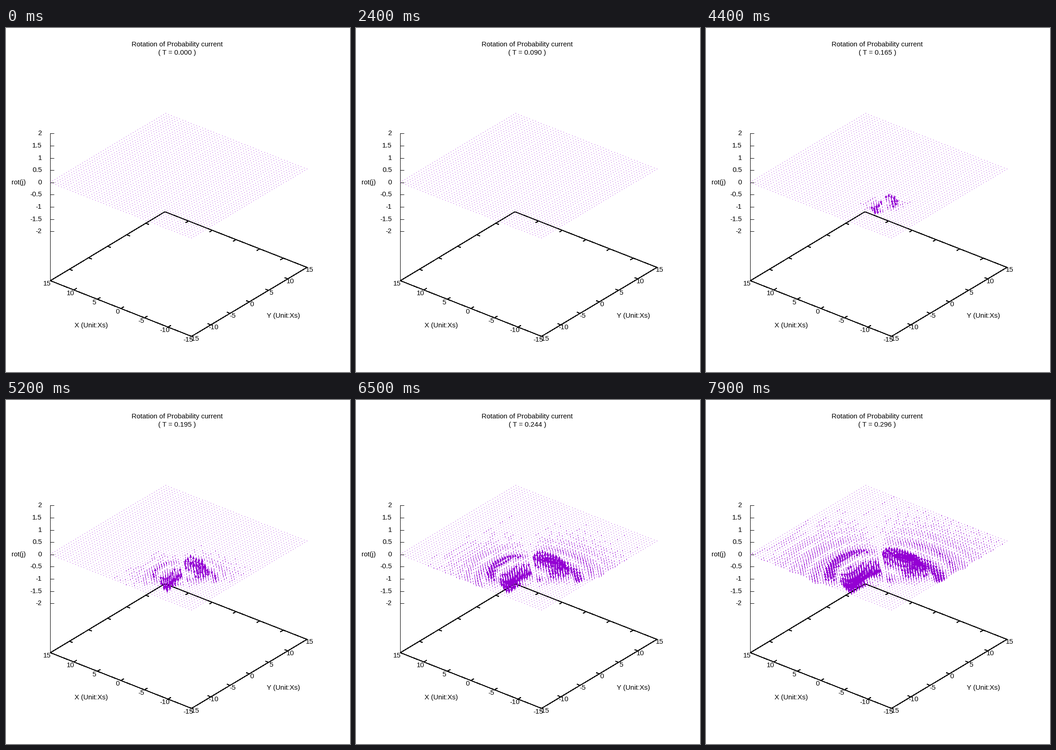
These frames come from a looping animation (748 px wide and 748 px high, 8 s). A matplotlib script:

```python
import numpy as np
import matplotlib.pyplot as plt
from matplotlib.animation import FuncAnimation
from matplotlib.collections import LineCollection, PolyCollection

SIZE, DPI = 748, 100
FRAMES, INTERVAL = 80, 100
DT = 0.00375
PX = 72 / DPI              # one pixel in points
Z_UNIT = 53.25             # pixels per unit of rot(j)
VIOLET = "#9400d3"

plt.rcParams["font.family"] = "Liberation Sans"
plt.rcParams["font.size"] = 15 * PX

fig = plt.figure(figsize=(SIZE / DPI, SIZE / DPI), dpi=DPI, facecolor="white")
ax = fig.add_axes([0, 0, 1, 1])
ax.set_xlim(0, SIZE)
ax.set_ylim(SIZE, 0)
ax.axis("off")


def project(x, y, z=0.0):
    """Data coordinates to stage pixels."""
    px = 374.7 - 10.233 * x + 8.367 * y
    py = 320.8 - 4.033 * x - 5.0 * y - Z_UNIT * z
    return px, py


def label(cx, cy, text, ha="center"):
    return ax.text(cx, cy + 5, text, ha=ha, va="baseline", color="black")


def draw_frame():
    left, front = np.array([96, 549]), np.array([403, 670])
    right, back = np.array([654, 520]), np.array([345, 399])
    along_x, along_y = np.array([6.5, 2.6]), np.array([6, -3.7])
    segs = [(left, front), (front, right), (right, back), (back, left),
            ((96, 228), (96, 549))]
    for k in range(7):
        f = k / 6
        value = 15 - 5 * k
        p = left + f * (front - left)
        segs.append((p, p + along_y))
        label(p[0] - 7, p[1] + 6.5, str(value))
        p = front + f * (right - front)
        segs.append((p, p - along_x))
        label(p[0] + 6.5, p[1] + 5, str(-value))
        p = left + f * (back - left)
        segs.append((p, p + along_x))
        p = back + f * (right - back)
        segs.append((p, p - along_y))
    for k in range(9):
        value = 2 - 0.5 * k
        y = round(228.3 + k * 26.63)
        segs.append(((96, y), (104, y)))
        label(78, y, f"{value:g}", ha="right")
    segs = [np.array(s, float) + 0.5 for s in segs]
    ax.add_collection(LineCollection(segs, colors="black", linewidths=PX,
                                     antialiaseds=False))
    label(372, 35, "Rotation of Probability current")
    label(185, 646, "X (Unit:Xs)")
    label(603.5, 625, "Y (Unit:Xs)")
    label(28, 334.5, "rot(j)")


draw_frame()
clock = label(372.5, 53, "")

side = np.linspace(-15, 15, 51)
gx, gy = (g.ravel() for g in np.meshgrid(side, side))
base_x, base_y = project(gx, gy)
col = np.round(base_x) + 0.5
row = np.round(base_y)
ax.plot(col, row + 0.5, ",", color=VIOLET)

# Along and across the direction of travel
U, V = (gx + gy) / 2, (gy - gx) / 2
R2 = (U + 7.1) ** 2 + 0.95 * V ** 2
WALL = 1 / (1 + np.exp(-(U + 8.1) / 0.25))


def curl(n):
    """Chirped rings spreading from the opening, odd across the diagonal."""
    spread = max(168 * (n * DT - 0.147), 0.8)
    q = R2 / spread
    peak = 0.6 / (1 + np.exp(-(n - 44) / 2.8))
    reach = 1.5 * (1 - np.exp(-max(n - 40, 2) / 18))
    tail = np.maximum(q - 0.6, 0) / reach
    envelope = peak * (1 + tail) ** -1.5 * np.exp(-(tail / 6) ** 2)
    width = 0.3 + 0.8 * np.sqrt(spread) * np.clip(q - 1, 0, 1)
    return envelope * WALL * np.tanh(V / width) * np.cos(np.pi * (q - 0.6))


shafts = LineCollection([], colors=VIOLET, linewidths=PX, antialiaseds=False)
heads = PolyCollection([], facecolors=VIOLET, edgecolors="none",
                       antialiaseds=False)
ax.add_collection(shafts)
ax.add_collection(heads)


def update(n):
    clock.set_text(f"( T = {n * DT + 1e-9:.3f} )")
    tip = np.round(base_y - Z_UNIT * curl(n))
    length = np.abs(tip - row)

    on = length >= 1
    x, a, b = col[on], row[on], tip[on]
    lo, hi = np.minimum(a, b), np.maximum(a, b) + 1
    shafts.set_segments(np.stack([np.column_stack([x, lo]),
                                  np.column_stack([x, hi])], axis=1))

    big = length >= 8
    x, y = col[big], tip[big] + 0.5
    back = y + np.sign(row[big] - tip[big]) * np.minimum(6, 0.45 * length[big])
    heads.set_verts(np.stack([np.column_stack([x, y]),
                              np.column_stack([x - 2, back]),
                              np.column_stack([x + 2, back])], axis=1))
    return clock, shafts, heads


anim = FuncAnimation(fig, update, frames=FRAMES, interval=INTERVAL,
                     repeat=True, repeat_delay=0, blit=False)
plt.show()
```
